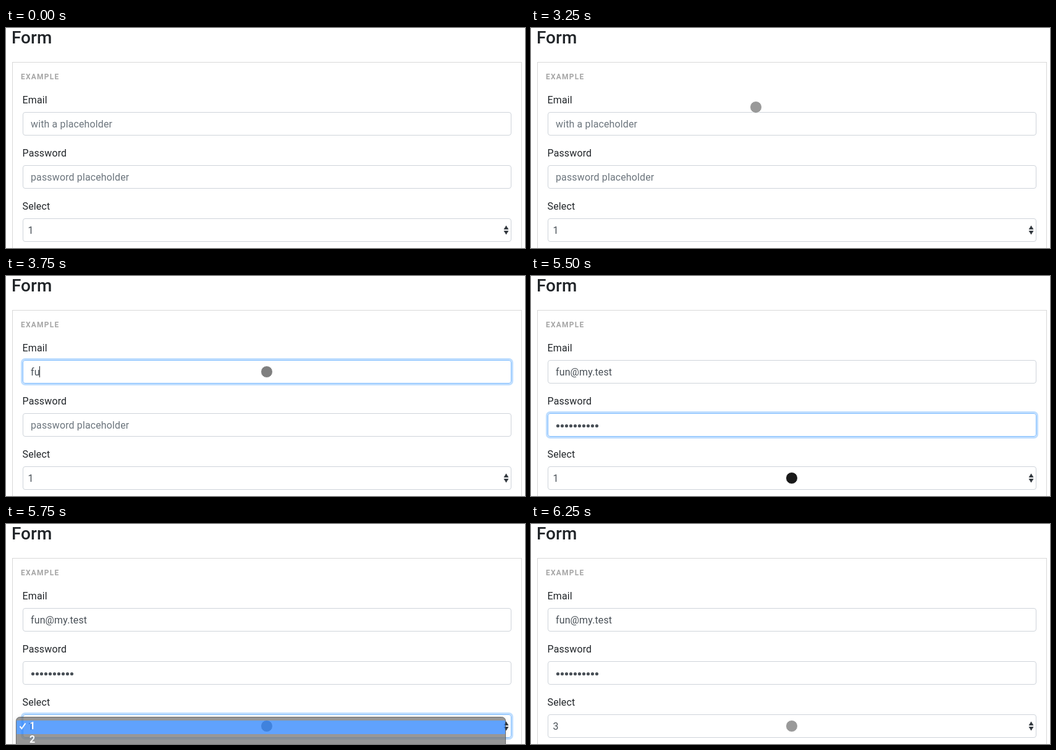
An HTML page that plays this animation: 840x356 px, repeating every 7500 ms.

```html
<!DOCTYPE html>
<html lang="en">
<head>
<meta charset="utf-8">
<title>Form</title>
<style>
  html, body { margin: 0; width: 100%; height: 100%; overflow: hidden; background: #fff; }
  svg { display: block; width: 840px; height: 356px; }
  text { font: 400 16px Roboto, sans-serif; letter-spacing: .13px; fill: #212529; white-space: pre; }
  .title { font-size: 28px; font-weight: 500; letter-spacing: 0; }
  .tag { font-size: 12px; font-weight: 700; letter-spacing: 1.2px; fill: #a6a6a6; }
  .value { fill: #495057; }
  .hint { fill: #6c757d; }
  .frame { fill: none; stroke: #d8d8d8; }
  .box { fill: #fff; stroke: #ced4da; }
  .glow { fill: none; stroke: #bfdeff; stroke-width: 3; visibility: hidden; }
  .focus .box { stroke: #80bdff; }
  .focus .glow { visibility: visible; }
  .menu { filter: drop-shadow(0 2px 5px rgba(0, 0, 0, .12)); }
  .menu text { font-weight: 700; fill: #fff; }
</style>
</head>
<body>
<svg id="stage" viewBox="0 0 840 356">
  <rect class="frame" x="10.5" y="55.5" width="824" height="320"/>
  <text class="title" x="9" y="25">Form</text>
  <text class="tag" x="24" y="83">EXAMPLE</text>
  <g id="fields"></g>
  <text id="email" x="40" y="161"></text>
  <text id="hint" class="hint" x="40" y="247">password placeholder</text>
  <rect id="dots" x="40" y="238" height="9" fill="url(#dot)"/>
  <text id="choice" class="value" x="35.5" y="333"></text>
  <path d="M809.5 319.5l4 6.5h-8zM809.5 334.5l4-6.5h-8z" fill="#343a40"/>
  <rect id="caret" width="1" height="18" fill="#212529"/>
  <circle id="pointer" r="9.5" stroke="#fff"/>
  <g id="menu" class="menu">
    <rect x="16.5" y=".5" width="792" height="140" rx="6" fill="#757575" stroke="#3c3c3c"/>
    <rect id="active" x="17" width="791" height="22" fill="#2c84fd"/>
    <path id="check" d="M22.5 9.5l3 3.5l6-8.5" fill="none" stroke="#fff" stroke-width="2"/>
  </g>
  <defs>
    <pattern id="dot" x="40" y="238" width="7" height="9" patternUnits="userSpaceOnUse">
      <circle cx="3.5" cy="4.5" r="2.6" fill="#495057"/>
    </pattern>
  </defs>
</svg>
<script>
const LOOP = 7500;
const EMAIL = 'fun@my.test';
const DOT_PITCH = 7;
const ROW = 22;

// Each step lists only what changes at that time.
const steps = [
  [0, { x: 128, y: 17, alpha: 0, focus: -1, caret: '', typed: 0, dots: 0, choice: 1, menu: 0 }],
  [2500, { alpha: .4 }],
  [2750, { x: 208, y: 54 }],
  [3000, { x: 285, y: 91 }],
  [3250, { x: 364, y: 128 }],
  [3500, { x: 422, y: 155, alpha: .9, caret: 'email' }],
  [3750, { alpha: .5, focus: 0, typed: 2 }],
  [4000, { alpha: .4, typed: 6 }],
  [4250, { typed: 11 }],
  [4500, { y: 241, alpha: .9 }],
  [4750, { alpha: .4, focus: 1, caret: 'password', dots: 2 }],
  [5000, { dots: 6 }],
  [5250, { dots: 10 }],
  [5500, { y: 327, alpha: .9, caret: '' }],
  [5750, { alpha: .5, focus: 2, menu: .75 }],
  [6000, { alpha: .4, choice: 3, menu: .88 }],
  [6250, { focus: -1, menu: 0 }]
];
let last = {};
const states = steps.map(([time, change]) => (last = { ...last, ...change, time }));

const $ = id => document.getElementById(id);
const set = (node, attrs) => {
  for (const name in attrs) node.setAttribute(name, attrs[name]);
  return node;
};
const add = (parent, tag, attrs, text = '') => {
  const node = set(document.createElementNS('http://www.w3.org/2000/svg', tag), attrs);
  node.textContent = text;
  return parent.appendChild(node);
};

const fields = ['Email', 'Password', 'Select'].map((label, i) => {
  const top = 136 + 86 * i;
  const group = add($('fields'), 'g', {});
  add(group, 'text', { x: 26.5, y: top - 14 }, label);
  add(group, 'rect', { class: 'glow', x: 25.5, y: top - 1.5, width: 794, height: 41, rx: 5.5 });
  add(group, 'rect', { class: 'box', x: 27.5, y: top + .5, width: 790, height: 37, rx: 3.5 });
  return group;
});
for (let i = 0; i < 4; i++) add($('menu'), 'text', { x: 38, y: 20 + ROW * i }, i + 1);

function render(s) {
  fields.forEach((field, i) => field.classList.toggle('focus', i === s.focus));

  $('email').textContent = s.typed ? EMAIL.slice(0, s.typed) : 'with a placeholder';
  set($('email'), { class: s.typed ? 'value' : 'hint' });
  set($('hint'), { visibility: s.dots ? 'hidden' : 'visible' });
  set($('dots'), { width: s.dots * DOT_PITCH });
  $('choice').textContent = s.choice;

  const emailWidth = s.typed ? $('email').getComputedTextLength() : 0;
  const inEmail = s.caret === 'email';
  set($('caret'), {
    x: 40 + Math.floor(inEmail ? emailWidth : s.dots * DOT_PITCH),
    y: inEmail ? 146 : 232,
    visibility: s.caret ? 'visible' : 'hidden'
  });

  set($('pointer'), {
    cx: s.x, cy: s.y, 'fill-opacity': s.alpha,
    visibility: s.alpha ? 'visible' : 'hidden'
  });

  // The chosen row always lies over the select box.
  const rowTop = 6 + ROW * (s.choice - 1);
  set($('menu'), {
    transform: `translate(0 ${318 - rowTop})`,
    opacity: s.menu,
    visibility: s.menu ? 'visible' : 'hidden'
  });
  set($('active'), { y: rowTop });
  set($('check'), { transform: `translate(0 ${rowTop})` });
}

let shown;
function tick() {
  const time = performance.now() % LOOP;
  const state = states.findLast(s => s.time <= time);
  if (state !== shown) render(shown = state);
  requestAnimationFrame(tick);
}
tick();
</script>
</body>
</html>
```
